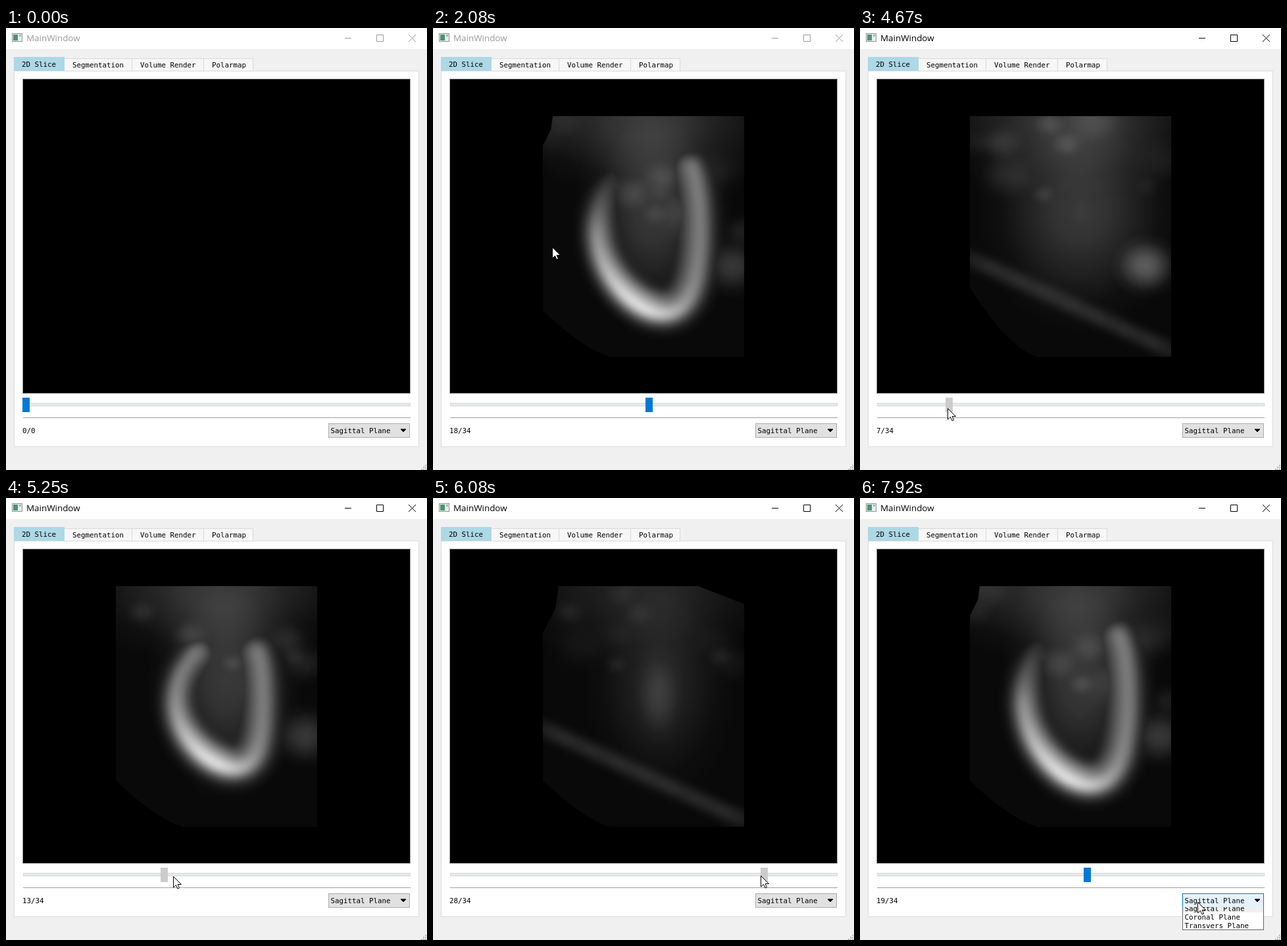
Animation of 640 by 672 pixels, one loop 8000 ms. Source, as an HTML page with a canvas:

```html
<!DOCTYPE html>
<html lang="en">
<head>
<meta charset="utf-8">
<title>MainWindow</title>
<style>
  html, body { margin: 0; width: 100%; height: 100%; overflow: hidden; background: #f0f0f0; }
  canvas { display: block; }
</style>
</head>
<body>
<canvas id="stage" width="640" height="672"></canvas>
<script>
const W = 640, H = 672, LOOP = 8000, STEP = 1000 / 12;
const PRESS = 3740, RELEASE = 6990;
const ctx = document.getElementById('stage').getContext('2d');
const MONO = '10.8px "DejaVu Sans Mono", monospace';
const INK = '#000', BLUE = '#0078d7', WHITE = '#fff', PALE = '#f0f0f0';

const clamp = (x, a = 0, b = 1) => Math.min(b, Math.max(a, x));
const mix = (a, b, k) => a + (b - a) * k;
const bell = x => Math.exp(-x * x);
const tone = (b, alpha = 1) => `rgb(${[b, b, b].map(q => 255 * clamp(q))} / ${alpha})`
  .replaceAll(',', ' ');

function layer() {
  const c = document.createElement('canvas');
  c.width = W; c.height = H;
  return c.getContext('2d');
}
const scan = layer(), wall = layer();

// Pointer path: time, x, y
const path = [
  [1330, 1, 227], [1500, 235, 374], [1670, 181, 333], [2580, 181, 333],
  [3330, 331, 580], [3670, 331, 580], [4420, 16, 582], [4580, 131, 578],
  [4670, 133, 578], [5250, 254, 575], [5920, 501, 574], [6080, 499, 574],
  [6900, 348, 576], [7080, 348, 576], [7660, 513, 614]
];
function pointer(t) {
  const i = path.findIndex(p => p[0] > t);
  if (i < 0) return path[path.length - 1].slice(1);
  if (!i) return [-50, -50];
  const a = path[i - 1], b = path[i], k = (t - a[0]) / (b[0] - a[0]);
  return [mix(a[1], b[1], k), mix(a[2], b[2], k)];
}

// Slice number on show; 0 while nothing is loaded. The slice lags the pointer by one step.
function sliceAt(t) {
  if (t < 2080) return 0;
  if (t < PRESS) return 18;
  const x = pointer(Math.min(t, RELEASE) - STEP)[0];
  return clamp(18 + Math.round((x - 331) / 17.5), 1, 34);
}

function blob(x, y, rx, ry, b, tilt = 0) {
  scan.save();
  scan.translate(x, y);
  scan.rotate(tilt);
  scan.scale(rx, ry);
  const g = scan.createRadialGradient(0, 0, 0, 0, 0, 1);
  for (let r = 0; r <= 1; r += .25) g.addColorStop(r, tone(b, (1 + Math.cos(Math.PI * r)) / 2));
  scan.fillStyle = g;
  scan.fillRect(-1, -1, 2, 2);
  scan.restore();
}

// Haze above and inside the muscle, a slanted band below it, and random flecks
function drawTissue(v, early, late) {
  const dim = mix(1, .6, late) * clamp(.5 + v / 14);
  blob(320, 135, 240, 120, .17 * dim);
  blob(mix(335, 345, late), 275, 120 + 40 * early, 190, .19 * dim);
  blob(mix(455, 435, early), 362, 55, 50, (.18 + .12 * early) * (1 - late));
  blob(343, 300, 40, 80, .1 * late);
  const far = Math.max(early, late);
  for (let x = 180; x < 480; x += 40)
    blob(x, 350 + .46 * (x - 167), 55, 24, .09 * far, .43);
  let seed = 11;
  const rand = () => (seed = seed * 16807 % 2147483647) / 2147483647;
  for (let i = 0; i < 22; i++) {
    const x = 175 + 295 * rand(), y = 134 + 220 * rand() * (.4 + .6 * (x - 167) / 306);
    const r = 22 + 34 * rand();
    blob(x, y, r, r * .8, .09 * dim * Math.max(0, Math.sin(v * .35 + 7 * rand())));
  }
}

// Open ring that grows with the slice number, then closes to a spot
function drawWall(v, early, late) {
  wall.clearRect(0, 0, W, H);
  const amp = (1 - early) * mix(1, .1, late);
  const grow = clamp((v - 13) / 5, -1, 1.1), s = 1 - .75 * late;
  const cx = 324 + 3 * grow, cy = 308 - 3 * grow;
  const rx = 68 + 12 * grow, ry = 105 + 27 * grow;
  const point = (a, k) => [
    mix(345, cx + k * rx * Math.sin(a) + 23 * Math.cos(a) ** 2, s),
    mix(300, cy + k * ry * Math.cos(a), s)
  ];
  wall.lineCap = 'round';
  for (const [size, width, bright] of [[.94, 72, .24], [.93, 46, .7], [.98, 20, 1.1]]) {
    for (let a = -2.4; a < 2.4; a += .06) {
      const glow = .46 + .4 * bell((a + .4) / .9);
      const tip = mix(1, clamp((a + 2.6) / 1.1), clamp(grow));
      wall.strokeStyle = tone(glow * tip * bright * amp);
      wall.lineWidth = width * mix(.7, 1, s) * (.9 + .1 * Math.sin(a));
      wall.beginPath();
      wall.moveTo(...point(a, size));
      wall.lineTo(...point(a + .06, size));
      wall.stroke();
    }
  }
}

let shown = -1;
function drawScan(v) {
  if (v === shown) return;
  shown = v;
  const early = clamp((13 - v) / 6), late = clamp((v - 19) / 9);
  const notch = clamp((v - 13) * 3, 0, 15) + 9 * late;
  scan.clearRect(0, 0, W, H);
  scan.save();
  scan.beginPath();
  scan.moveTo(167 + notch, 134);
  scan.lineTo(473 - 70 * late, 134);
  scan.lineTo(473, 134 + 27 * late);
  scan.lineTo(473, 500);
  scan.lineTo(268, 500);
  scan.quadraticCurveTo(225, 485, 167, 430 - 35 * early);
  scan.lineTo(167, 134 + notch * 3);
  scan.lineTo(167 + notch * .8, 134 + notch * 1.4);
  scan.clip();
  scan.fillStyle = tone(.035);
  scan.fillRect(160, 130, 320, 380);
  scan.globalCompositeOperation = 'lighter';
  drawTissue(v, early, late);
  drawWall(v, early, late);
  scan.globalCompositeOperation = 'lighten';
  scan.filter = 'blur(8px)';
  scan.drawImage(wall.canvas, 0, 0);
  scan.restore();
}

function box(x, y, w, h, fill, line) {
  ctx.fillStyle = fill;
  ctx.fillRect(x, y, w, h);
  if (!line) return;
  ctx.strokeStyle = line;
  ctx.lineWidth = 1;
  ctx.strokeRect(x + .5, y + .5, w - 1, h - 1);
}
function text(s, x, y, font = MONO, color = INK) {
  ctx.font = font;
  ctx.fillStyle = color;
  ctx.fillText(s, x, y);
}
function trace(d, color, x = 0, y = 0, fill) {
  ctx.save();
  ctx.translate(x, y);
  const p = new Path2D(d);
  if (fill) { ctx.fillStyle = fill; ctx.fill(p); }
  ctx.strokeStyle = color;
  ctx.lineWidth = 1;
  ctx.stroke(p);
  ctx.restore();
}

function drawFrame(active) {
  box(0, 0, W, H, PALE);
  box(0, 0, W, 32, WHITE);
  box(9, 8, 16, 13, '#e8ecec', '#8c9494');
  box(11, 10, 7, 9, '#4c9470');
  box(20, 10, 3, 3, '#a0b8a8');
  const color = active ? INK : '#999';
  text('MainWindow', 31, 20, '13.4px "Open Sans", sans-serif', color);
  trace('M515 15.5h10M563.5 10.5h10v10h-10zM612 10l11 11M623 10l-11 11', color);

  box(12, 65, 616, 572, WHITE, '#dcdcdc');
  [['Segmentation', 88, 104], ['Volume Render', 191, 110], ['Polarmap', 300, 76]]
    .forEach(([s, x, w]) => { box(x, 46, w, 20, '#f7f7f7', '#d9d9d9'); text(s, x + 13, 60); });
  box(12, 44, 77, 21, '#add8e6');
  text('2D Slice', 24, 59);
  box(25, 77, 590, 479, '#000', '#a0a0a0');
  box(26, 570, 589, 5, '#e7eaea', '#d6d6d6');
  box(26, 592, 589, 1, '#a0a0a0');
  for (let i = 0; i < 3; i++)
    for (let j = 0; j <= i; j++) box(637 - j * 3, 664 + i * 3, 2, 2, '#b8b8b8');
}

function drawCombo(t, [x, y]) {
  const over = x > 490 && x < 614 && y > 601 && y < 623;
  box(490, 601, 124, 22, over ? '#e5f1fb' : '#e1e1e1', over ? BLUE : '#adadad');
  text('Sagittal Plane', 493.5, 616);
  trace('M600 610h8l-4 4z', INK, 0, 0, INK);
  if (t < 7820) return;
  const end = t < 7910 ? 647 : 657;
  ctx.save();
  ctx.beginPath();
  ctx.rect(490, 622, 124, end - 622);
  ctx.clip();
  box(490, 610, 124, end - 610, WHITE, '#646464');
  box(491, end - 40, 122, 13, PALE);
  ['Sagittal', 'Coronal', 'Transvers'].forEach((s, i) =>
    text(s + ' Plane', 493.5, end - 29 + i * 13));
  ctx.restore();
}

function draw(t) {
  const at = pointer(t), v = sliceAt(t), x = 31 + (Math.max(v, 1) - 1) * 17.5;
  const drag = t > PRESS && t < RELEASE;
  const hover = Math.abs(at[0] - x) < 6 && at[1] > 561 && at[1] < 585;
  drawFrame(t > PRESS);
  if (v) {
    drawScan(v);
    ctx.drawImage(scan.canvas, 0, 0);
  }
  box(Math.floor(x - 5.5), 562, 11, 22, drag ? '#ccc' : hover ? '#171717' : BLUE);
  text(v ? v + '/34' : '0/0', 25, 616);
  drawCombo(t, at);
  trace('M0 0V16.5L4 13L6.5 18.5L9 17.5L6.6 12H12Z', INK,
    Math.round(at[0]) + .5, Math.round(at[1]) + .5, WHITE);
}

function tick(now) {
  const t = now % LOOP;
  draw(Math.floor((t + 5) / STEP) * STEP);
  requestAnimationFrame(tick);
}
requestAnimationFrame(tick);
</script>
</body>
</html>
```
